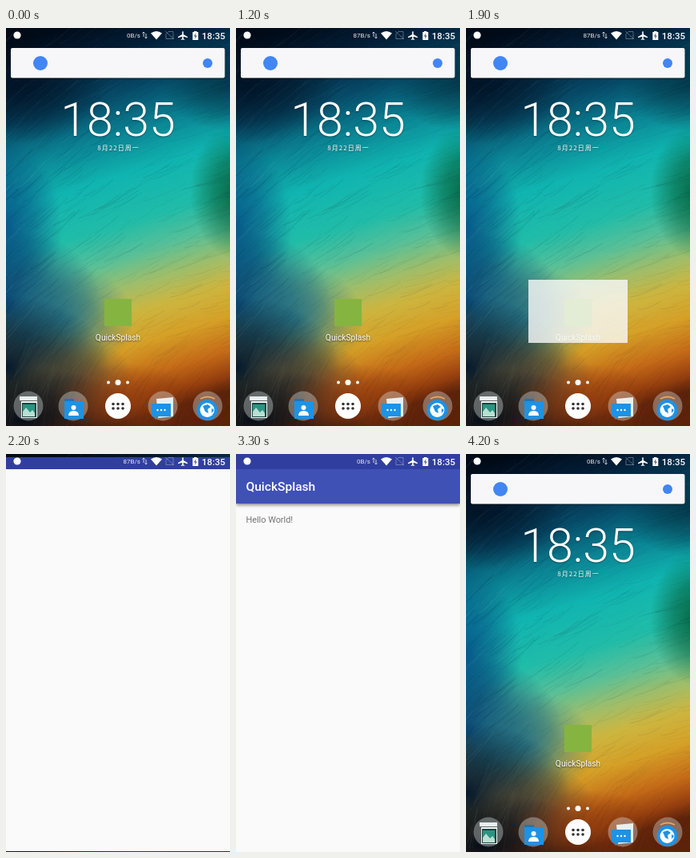
An HTML page with a canvas for the animation above (4300 ms loop, 280 by 498 pixels).

```html
<!DOCTYPE html>
<html lang="en">
<head>
<meta charset="utf-8">
<title>QuickSplash</title>
<style>
  html, body { margin: 0; width: 100%; height: 100%; overflow: hidden; background: #000; }
  canvas { display: block; width: 280px; height: 498px; }
</style>
</head>
<body>
<canvas id="stage"></canvas>
<script>
const W = 280, H = 498, LOOP = 4300, STEP = 100;
const dpr = window.devicePixelRatio || 1;
const SANS = 'Roboto, "Noto Sans", sans-serif';
const CJK = '"Noto Sans CJK SC", "Noto Sans CJK", sans-serif';

function prepare(canvas) {
  canvas.width = W * dpr;
  canvas.height = H * dpr;
  const context = canvas.getContext('2d');
  context.scale(dpr, dpr);
  return context;
}

let ctx;

function rect(x, y, w, h, color) {
  ctx.fillStyle = color;
  ctx.fillRect(x, y, w, h);
}

function disc(x, y, r, color) {
  ctx.fillStyle = color;
  ctx.beginPath();
  ctx.arc(x, y, r, 0, 7);
  ctx.fill();
}

function shape(path, color, stroke) {
  const p = new Path2D(path);
  if (stroke) {
    ctx.lineWidth = stroke;
    ctx.strokeStyle = color;
    ctx.stroke(p);
  } else {
    ctx.fillStyle = color;
    ctx.fill(p);
  }
}

function text(str, x, y, font, color = '#fff', align = 'left') {
  ctx.font = font;
  ctx.fillStyle = color;
  ctx.textAlign = align;
  ctx.fillText(str, x, y);
}

function shadowed(blur, dy, color, draw) {
  ctx.save();
  ctx.shadowBlur = blur * dpr;
  ctx.shadowOffsetY = dy * dpr;
  ctx.shadowColor = color;
  draw();
  ctx.restore();
}

function seeded(seed) {
  return () => (seed = seed * 16807 % 2147483647) / 2147483647;
}

function wallpaper() {
  // Colour bands that rise to the right
  const base = ctx.createLinearGradient(70, 0, 212, 474);
  [[0, '#010b18'], [.1, '#03203a'], [.2, '#064a68'], [.3, '#0a8494'],
   [.4, '#10b4b0'], [.52, '#20bca8'], [.6, '#58c098'], [.67, '#9cbe6c'],
   [.74, '#ccb640'], [.82, '#d6a026'], [.9, '#c66c18'], [.96, '#98400e'], [1, '#5c220a']]
    .forEach(([at, color]) => base.addColorStop(at, color));
  rect(0, 0, W, H, base);

  // Soft light: centre, horizontal and vertical radius, red-green-blue, strength
  const glows = [
    [20, 75, 110, 70, '1,14,30', .7],
    [285, 70, 90, 60, '2,34,52', .7],
    [290, 205, 60, 85, '4,96,60', .95],
    [0, 250, 70, 110, '5,72,130', .85],
    [0, 345, 120, 95, '4,60,112', .95],
    [70, 365, 90, 70, '24,112,140', .8],
    [0, 425, 130, 90, '2,24,46', 1],
    [80, 440, 80, 55, '62,60,56', .75],
    [20, 490, 150, 65, '6,14,24', 1],
    [150, 465, 90, 45, '140,56,14', .7]
  ];
  for (const [x, y, rx, ry, rgb, strength] of glows) {
    ctx.save();
    ctx.translate(x, y);
    ctx.scale(rx, ry);
    const glow = ctx.createRadialGradient(0, 0, 0, 0, 0, 1);
    glow.addColorStop(0, `rgba(${rgb},${strength})`);
    glow.addColorStop(.5, `rgba(${rgb},${strength * .6})`);
    glow.addColorStop(1, `rgba(${rgb},0)`);
    disc(0, 0, 1, glow);
    ctx.restore();
  }

  // Feathery strokes: flat at the right, steep along the bottom
  const random = seeded(71);
  for (let i = 0; i < 1600; i++) {
    const x = random() * 340 - 50, y = random() * 540 - 10;
    const length = 20 + random() * 45;
    const steep = .7 * Math.max(0, (y - 380) / 118);
    const angle = -.25 - .5 * (1 - x / W) - steep + (random() - .5) * .2;
    const dx = Math.cos(angle) * length, dy = Math.sin(angle) * length;
    const edge = 1 - Math.min(1, Math.max(0, x / 160));
    const alpha = (.02 + random() * .05) * (1 + edge);
    ctx.strokeStyle = random() < .55 ? `rgba(0,16,36,${alpha})` : `rgba(150,220,200,${alpha * .6})`;
    ctx.lineWidth = .5 + random() * .7;
    ctx.beginPath();
    ctx.moveTo(x, y);
    ctx.quadraticCurveTo(x + dx * .5, y + dy * .5 + 4, x + dx, y + dy);
    ctx.stroke();
  }
}

function dock() {
  for (const x of [28, 84, 196, 252]) disc(x, 473, 18.5, 'rgba(225,235,235,.36)');

  // Gallery
  rect(17, 461, 22, 5, '#e8eeee');
  rect(19, 467, 20, 21, '#f4f6f6');
  rect(20, 469, 18, 18, '#17443f');
  rect(21, 471, 15, 15, '#2b9482');
  shape('M21 486V480L25 475L30 481L33 478L36 482V486Z', '#b7dfd2');

  // Contacts
  rect(73, 464, 12, 4, '#1778bd');
  rect(73, 467, 24, 22, '#1e92e4');
  disc(84.5, 475, 3, '#fff');
  shape('M78 485Q78 479 84.5 479Q91 479 91 485Z', '#fff');

  // App drawer
  disc(140, 473, 16, '#fff');
  for (const x of [134, 140, 146])
    for (const y of [470.5, 476]) disc(x, y, 1.8, '#333');

  // Messages
  shape('M188 464L209 462V486L190 488Z', '#e9eff1');
  shape('M182 470H206V486H191L186 490V486H182Z', '#1e92e4');
  for (const x of [189.5, 194, 198.5]) disc(x, 478, 1.2, '#fff');

  // Browser
  shape('M243 464Q252 459 261 464', '#e7a45b', 2);
  disc(251.5, 478, 13, '#1e92e4');
  disc(251.5, 478, 9, '#fff');
  shape('M246 473L252 471L256 474L252 477L253 482L249 480ZM257 476L260 478L257 482Z', '#1e92e4');
}

function home() {
  wallpaper();

  shadowed(2, 1, 'rgba(0,0,0,.5)', () => {
    ctx.fillStyle = '#f7f7f9';
    ctx.beginPath();
    ctx.roundRect(6, 25, 267.5, 37.5, 2);
    ctx.fill();
  });
  disc(43, 44, 9, '#4285f4');
  disc(252, 44, 6, '#4285f4');

  shadowed(2, 1, 'rgba(0,0,0,.35)', () => {
    text('18:35', 140, 135, `300 59px ${SANS}`, '#fff', 'center');
    ctx.letterSpacing = '1px';
    text('8月22日周一', 140.5, 153, `500 8px ${CJK}`, '#fff', 'center');
    ctx.letterSpacing = '0px';
  });

  rect(123, 339, 34, 34, '#86b440');
  shadowed(2, 1, 'rgba(0,0,0,.6)', () =>
    text('QuickSplash', 140, 391, `10.2px ${SANS}`, '#fff', 'center'));

  disc(128, 443.5, 2, '#fff');
  disc(140, 443.5, 3.5, '#fff');
  disc(152, 443.5, 2, '#fff');
  dock();
}

function appWindow(loaded) {
  rect(0, 0, W, H, '#fafafa');
  if (loaded) {
    shadowed(4, 1.5, 'rgba(0,0,0,.45)', () => rect(0, 19, W, 43, '#3f51b5'));
    text('QuickSplash', 12.4, 46.3, `500 15.56px ${SANS}`);
    text('Hello World!', 12.4, 86.3, `10.9px ${SANS}`, '#737373');
  }
  rect(0, 0, W, 19, '#303f9f');
}

function statusBar(speed) {
  disc(14, 9, 4.6, '#fff');
  text(speed, 168, 12.3, `8px ${SANS}`, '#e4e8ec', 'right');
  shape('M172 11V5M170.5 6.5L172 5L173.5 6.5M175 7V13M173.5 11.5L175 13L176.5 11.5', '#dde3e8', .9);
  shape('M181 6.5Q188 1.5 195 6.5L188 14.5Z', '#fff');
  shape('M203 4.5H209V13.5H200V7.5ZM199 4L210 14', 'rgba(200,210,220,.4)', 1);
  shape('M220.2 5Q221 3 221.8 5V8L227 11V12.3L221.8 10.7V13.2L223.2 14.3V15L221 14.4L218.8 15V14.3L220.2 13.2V10.7L215 12.3V11L220.2 8Z', '#fff');
  shape('M233.3 5H235V4H238.5V5H240.3V15H233.3Z', '#fff');
  shape('M237.5 6L234.8 10.4H236.6L236 14L238.9 9.4H237Z', '#53606c');
  text('18:35', 274, 13.6, `500 11.5px ${SANS}`, '#fff', 'right');
}

const backdrop = document.createElement('canvas');
ctx = prepare(backdrop);
home();
const stage = document.getElementById('stage');
ctx = prepare(stage);

function render(t) {
  ctx.drawImage(backdrop, 0, 0, W, H);

  if (t >= 1900 && t < 4100) {
    const opening = (t - 1900) / 100;
    const inset = Math.pow(.233, opening);
    const left = Math.floor(78 * inset), top = Math.round(315 * inset);
    const bottom = Math.round(H - 104 * inset);
    const slide = t > 3600 ? 4 * Math.pow((t - 3600) / 100, 3) : 0;

    ctx.save();
    ctx.translate(0, slide);
    ctx.beginPath();
    ctx.rect(left, top, W - 2 * left, bottom - top);
    ctx.clip();
    ctx.globalAlpha = Math.min(1, .8 + opening * .2);
    appWindow(t >= 2900);
    ctx.restore();
  }

  statusBar(t >= 1000 && t < 2500 ? '87B/s' : '0B/s');
}

function tick() {
  const t = performance.now() % LOOP;
  render(Math.floor(t / STEP) * STEP);
  requestAnimationFrame(tick);
}
tick();
</script>
</body>
</html>
```
